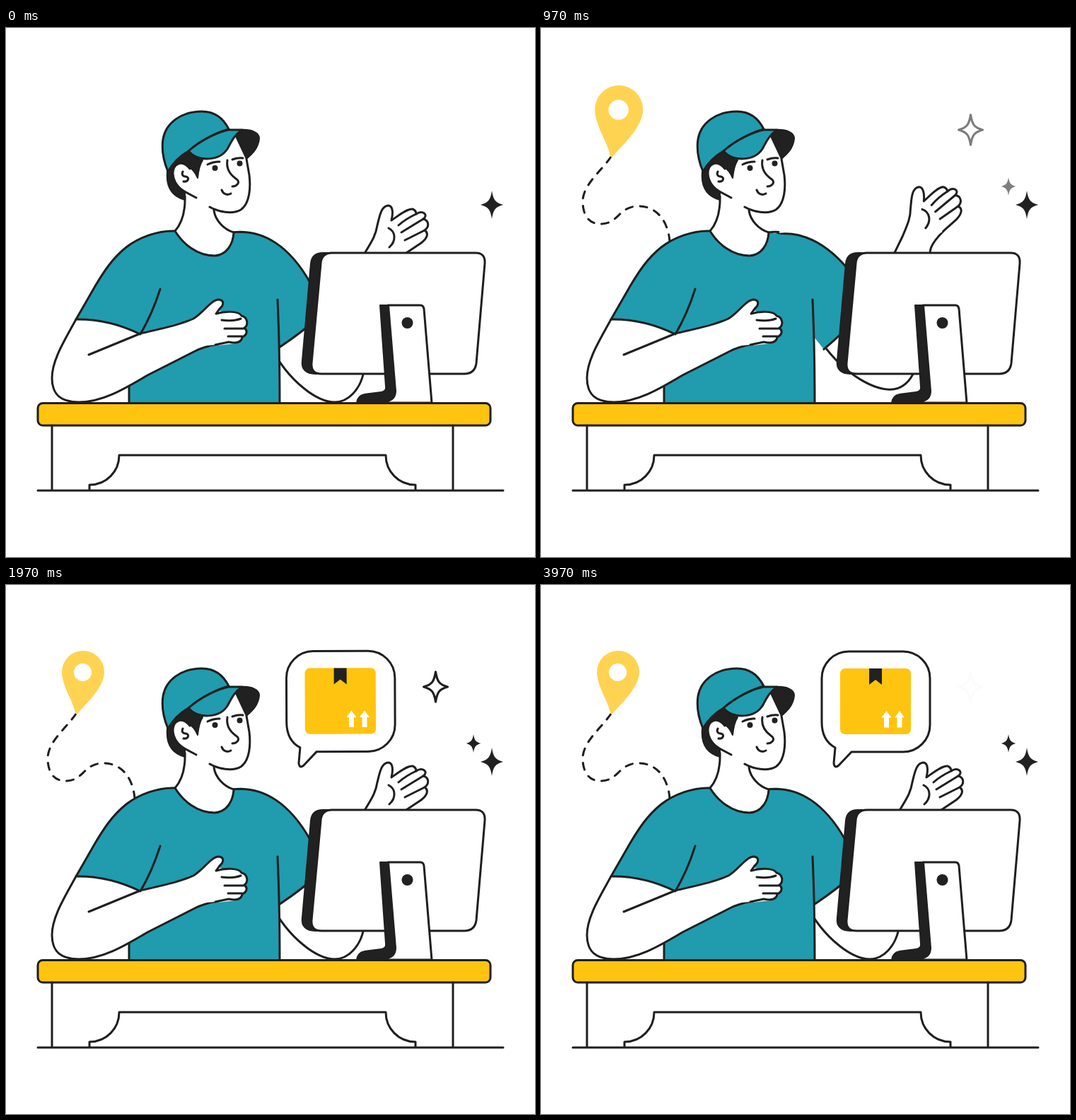
Animation of 748x748 px, one loop 4000 ms. Source, as an HTML page:

```html
<!DOCTYPE html>
<html lang="en">
<head>
<meta charset="utf-8">
<title>Delivery desk</title>
<style>
html, body { margin: 0; width: 100%; height: 100%; overflow: hidden; background: #fff; }
svg { display: block; width: 100vw; height: 100vh; }
.ink { fill: none; stroke: #1f1f1f; stroke-width: 3; stroke-linecap: round; stroke-linejoin: round; }
.w { fill: #fff; }
.teal { fill: #209cae; }
.gold { fill: #ffc40f; }
.dark { fill: #212121; }
.bare { stroke: none; }
</style>
</head>
<body>
<svg viewBox="0 0 748 748">
<defs>
  <path id="star" d="M0-20C2-7 5-3 16 0C5 3 2 7 0 20C-2 7-5 3-16 0C-5-3-2-7 0-20Z"/>
  <path id="arrow" d="M0 0l7 9.500h-3.500v14h-7v-14h-3.500z"/>
  <path id="trail" pathLength="256" d="M182 302C180 275 165 252 138 252C110 252 110 276 86 277C72 278 60 270 59 247C58 222 85 203 99 182"/>
  <mask id="reveal" maskUnits="userSpaceOnUse" x="0" y="0" width="748" height="748">
    <use id="wipe" href="#trail" fill="none" stroke="#fff" stroke-width="8" stroke-dasharray="260 260"/>
  </mask>
</defs>

<g class="ink">
  <!-- route and pin -->
  <g mask="url(#reveal)"><use href="#trail" stroke-dasharray="10 10.5"/></g>
  <g id="pin" class="bare">
    <path fill="#ffd352" d="M98 181C96 166 79 143 79 123A30 30 0 0 1 139 123C139 145 113 168 102 181Q100 184 98 181Z"/>
    <circle class="w" cx="108.5" cy="123.5" r="12.5"/>
  </g>

  <!-- waving arm -->
  <g id="arm">
    <path class="w bare" d="M375 452C400 500 440 529 465 529C485 529 500 510 505 490L540 365L566 318L540 290L508 317L485 351L428 421Z"/>
    <path d="M375 452C400 500 440 529 465 529C485 529 500 510 505 490L540 365C542 340 545 334 566 318"/>
    <path class="w" d="M485 351L508 317C519 299 523 292 525 279C528 268 530 251 541 251C548 252 547 264 545 272C554 266 567 255 575 256Q580 258 580 263C589 257 598 264 590 270C598 272 599 281 592 286C598 290 596 297 587 304L566 318"/>
    <path d="M580 263Q565 270 555 279M590 270L559 289M592 286L564 300M541 283C551 288 552 301 542 310"/>
    <path class="teal bare" d="M323 289C364 284 402 310 430 360L428 421L375 459L353 421Z"/>
    <path d="M323 289C364 284 402 310 430 360L446 390L428 421Q405 440 375 459"/>
  </g>

  <!-- shirt -->
  <path class="teal bare" d="M239 287C215 286 188 296 170 310C150 326 138 345 126 365L99 412Q145 411 190 433L174 480V530H387C387 470 386 420 384 384L352 294L322 289Z"/>
  <path d="M239 287C215 286 188 296 170 310C150 326 138 345 126 365L99 412M322 289Q328 288 336 288.500M384 384C385 410 387 445 387 530M174 530V500"/>
  <path class="w bare" d="M253 225C254 262 247 278 239 287C250 305 270 322 295 322C312 321 321 306 322 289C308 285 296 272 294 250Z"/>
  <path d="M253 236C254 262 247 278 239 287C250 305 270 322 295 322C312 321 321 306 322 289C308 285 296 272 294 258"/>

  <!-- resting arm -->
  <path class="w bare" d="M99 412C82 443 65 470 65 495C65 518 77 529 103 529C135 529 165 512 200 491L267 457C280 450 300 449 325 446L336 408L302 400L265 411L190 433Q145 411 99 412Z"/>
  <path d="M190 433Q145 411 99 412C82 443 65 470 65 495C65 518 77 529 103 529C135 529 165 512 200 491L267 457C280 450 295 448 300 447"/>
  <path class="w" d="M117 462L190 432C220 425 245 420 265 411C280 402 290 384 301 384C309 385 308 392 302 397L297 404C310 400 330 400 333 407C342 409 343 420 337 424C342 428 341 434 334 437C333 445 325 446 315 444Q305 446 296 448"/>
  <path d="M218 369Q207 404 190 433M305 413Q322 415 332 411M309 425H336M314 436H334"/>

  <!-- head -->
  <path class="w bare" d="M253 236L240 215L240 190L270 170L330 148L340 186L344 208C346 225 345 248 332 257C320 264 300 260 288 253Z"/>
  <path d="M340 185L344 208C346 225 345 248 332 257C320 264 300 260 288 253"/>
  <path class="dark" stroke-width="2" d="M229 200C240 185 250 178 258 174C265 182 272 186 278 187C274 193 272 202 271 212C268 205 264 199 258 196C248 187 236 192 236 206C237 220 245 228 253 232V243C235 238 226 225 228 203Z"/>
  <path class="w" d="M260 199C248 185 236 192 236 206C237 220 245 227 254 232L269 240"/>
  <path d="M250 203C248 207 250 210 254 210C260 211 258 218 251 217"/>
  <path class="teal" d="M229 203C222 186 220 170 222 157C226 134 248 118 277 118C296 118 308 129 315 143C300 147 276 158 258 174Q240 184 229 203Z"/>
  <path class="dark" stroke-width="2" d="M325 153L332 144C347 143 358 148 358 156C357 170 348 178 340 185Z"/>
  <path class="teal" d="M258 174C276 158 300 147 315 144L334 144C323 151 319 160 313 171C302 188 272 190 258 174Z"/>
  <path d="M313 187C311 200 318 208 325 213C333 218 326 224 320 224M285 193Q293 189 302 189M320 186Q328 183 335 184M305 229C307 235 313 237 318 234"/>
  <g class="dark bare"><circle cx="295.500" cy="198" r="4"/><circle cx="330.500" cy="191.500" r="4"/></g>

  <!-- monitor -->
  <path class="dark" stroke-width="2" d="M461 318H448C438 318 432 323 431 333L419 470C417 483 425 489 437 489H450Z"/>
  <path class="w" d="M461 318H664Q678 318 677 333L665 474Q663 489 648 489H446Q431 489 432 474L445 333Q446 318 461 318Z"/>
  <path class="w" d="M540 392H586Q590 392 591 397L602 530H540Z"/>
  <path class="dark" stroke-width="2" d="M529 392H541L551 513Q551 526 538 528L496 530Q497 520 507 518L530 515Q538 514 537 507Z"/>
  <circle class="dark bare" cx="567.500" cy="417" r="8"/>

  <!-- table -->
  <rect class="gold" x="45" y="530.500" width="640" height="31.500" rx="7"/>
  <path d="M45 654H703M65 562V654M632 562V654M118 654V646C142 646 160 627 160 604H537C537 627 555 646 579 646V654"/>

  <!-- speech bubble -->
  <g id="bubble">
    <path class="w" vector-effect="non-scaling-stroke" d="M439 236H512A38 38 0 0 0 550 198V132A38 38 0 0 0 512 94H435A38 38 0 0 0 397 132V194C397 212 405 224 416 230L414 252Q415 260 421 255Z"/>
    <g class="bare">
      <rect class="gold" x="423" y="118" width="100" height="93" rx="7"/>
      <path class="dark" d="M464 118h18v23l-9-7l-9 7z"/>
      <use class="w" href="#arrow" x="488.500" y="178"/>
      <use class="w" href="#arrow" x="507" y="178"/>
    </g>
  </g>
</g>

<use id="big" class="dark" href="#star" transform="translate(687 250)"/>
<use id="small" class="dark" href="#star" transform="translate(661 224) scale(.65)"/>
<use id="hollow" class="ink" href="#star" transform="translate(607.5 144) scale(1.06)"/>
</svg>

<script>
const LOOP = 4000, POP = 333, PEAK = 1.15, FADE = 1667;
const $ = id => document.getElementById(id);
const clamp = x => Math.min(1, Math.max(0, x));
const ease = x => (1 - Math.cos(Math.PI * clamp(x))) / 2;
const swing = (t, span) => t > 0 && t < span ? (1 - Math.cos(2 * Math.PI * t / span)) / 2 : 0;

// Grow past full size, then settle.
function pop(t, start) {
  const u = (t - start) / POP;
  return u < 1 ? PEAK * ease(u) : PEAK - (PEAK - 1) * ease(u - 1);
}

function place(id, x, y, scale, turn = 0) {
  const el = $(id);
  el.style.display = scale > 0.002 ? '' : 'none';
  el.setAttribute('transform',
    `translate(${x} ${y}) rotate(${turn}) scale(${scale}) translate(${-x} ${-y})`);
}

function draw(t) {
  const drawn = ease(t / 567);
  $('wipe').setAttribute('stroke-dashoffset', 260 * (1 - drawn));
  $('wipe').style.display = drawn > 0 ? '' : 'none';

  place('pin', 100, 182, pop(t, 567));
  place('bubble', 417, 257, pop(t, 1333), -13 * swing(t - 1333, 2 * POP));
  place('arm', 355, 284, 1, -14.5 * swing(t, 1333));

  const glow = clamp(Math.min(t, LOOP - t) / FADE);
  $('hollow').style.opacity = glow;
  $('small').style.opacity = t >= 3930 ? 1 : glow;
  $('big').style.opacity = t >= 1600 && t < 1900 ? 0 : 1;
}

const begin = performance.now();
function tick() {
  draw((performance.now() - begin) % LOOP);
  requestAnimationFrame(tick);
}
tick();
</script>
</body>
</html>
```
